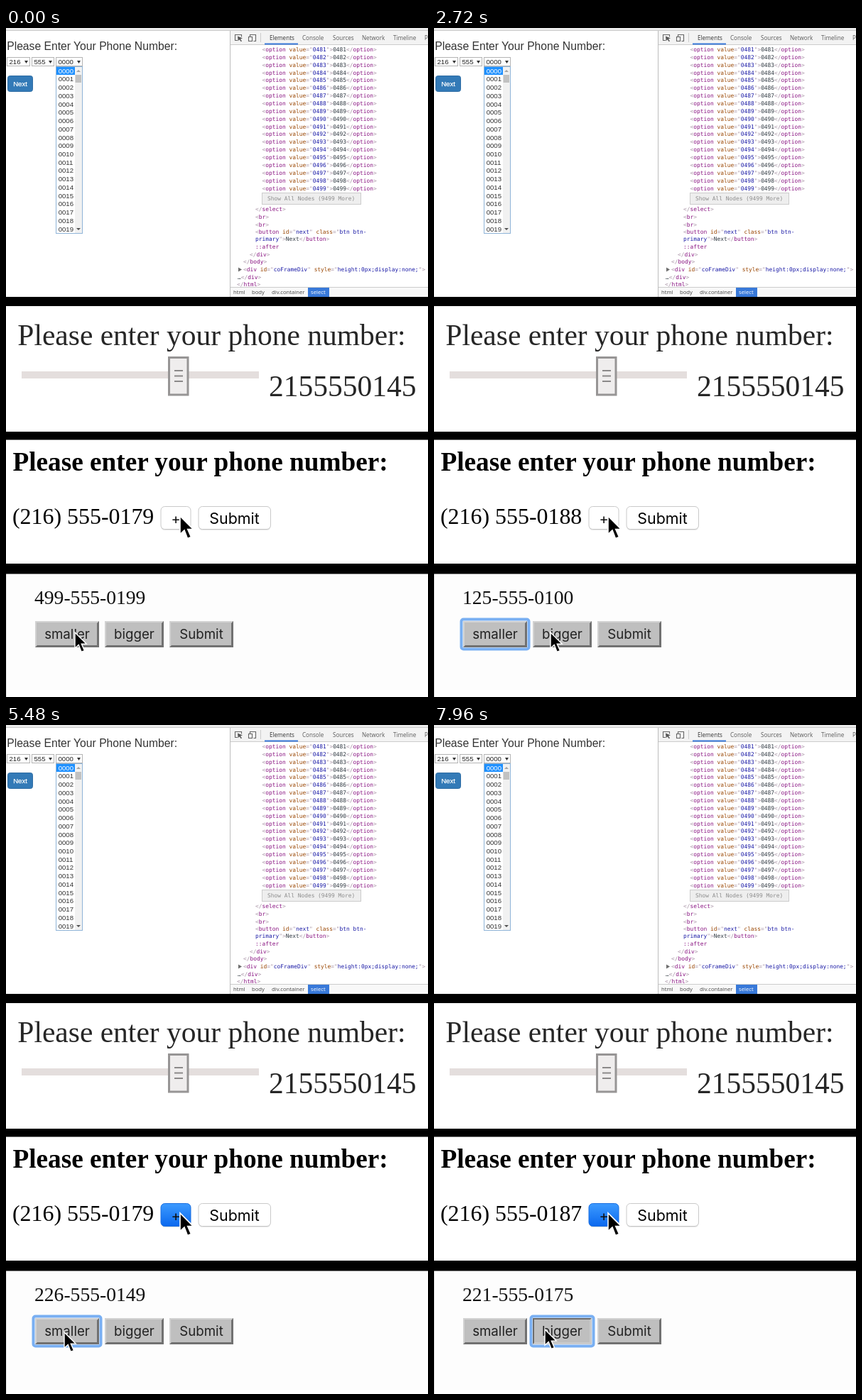
An HTML page for the animation above (8000 ms loop, 594x943 px).

```html
<!DOCTYPE html>
<html lang="en">
<head>
<meta charset="utf-8">
<title>Phone number forms</title>
<style>
html, body { margin: 0; width: 100%; height: 100%; overflow: hidden; background: #fff; }
svg { display: block; width: 594px; height: 943px; }
text { white-space: pre; }
.sans { font-family: "Liberation Sans", Arial, sans-serif; }
.serif { font-family: "Liberation Serif", Times, serif; }
.ui { font-family: "Open Sans", sans-serif; }
.mac { font-family: Inter, sans-serif; }
.mono { font-family: "DejaVu Sans Mono", monospace; }
</style>
</head>
<body>
<svg id="stage" viewBox="0 0 594 943" xmlns="http://www.w3.org/2000/svg">
  <defs>
    <linearGradient id="blue" x2="0" y2="1">
      <stop offset="0" stop-color="#3d9bff"/><stop offset="1" stop-color="#0a68ee"/>
    </linearGradient>
  </defs>
</svg>
<script>
const LOOP = 8000, STEP = 40;
const stage = document.getElementById('stage');

function add(tag, attrs, parent = stage) {
  const node = document.createElementNS('http://www.w3.org/2000/svg', tag);
  for (const key in attrs) node.setAttribute(key, attrs[key]);
  return parent.appendChild(node);
}
const rect = (x, y, width, height, fill, more = {}) => add('rect', { x, y, width, height, fill, ...more });
const path = (d, fill, more = {}) => add('path', { d, fill, ...more });
function text(x, y, content, family, size, fill = '#000', more = {}) {
  const node = add('text', { x, y, class: family, 'font-size': size, fill, ...more });
  node.textContent = content;
  return node;
}
const middle = { 'text-anchor': 'middle' };

// Phone number drop-downs
function dropdown(x, width, label) {
  rect(x + .5, 41.5, width, 12, '#fff', { stroke: '#b4b4b4' });
  text(x + 3.5, 51, label, 'sans', 9.6, '#222');
  path(`M${x + width - 7} 46h5l-2.5 4z`, '#333');
}
function drawDropdowns() {
  rect(0, 0, 594, 3, '#ececec');
  rect(0, 3, 594, 1, '#c9c9c9');
  text(1.2, 31, 'Please Enter Your Phone Number:', 'sans', 15.7, '#333');
  dropdown(1, 32, '216');
  dropdown(36, 31, '555');
  dropdown(70, 37, '0000');
  rect(2.5, 67.5, 35, 22, '#337ab7', { rx: 3, stroke: '#2e6da4' });
  text(20, 82, 'Next', 'sans', 9.6, '#fff', { ...middle, stroke: '#fff', 'stroke-width': .25 });
  rect(70.5, 54.5, 37, 235, '#fff', { stroke: '#8fb4d8' });
  rect(71, 55, 26, 11, '#1e90ff');
  for (let i = 0; i < 20; i++)
    text(73.7, 63.6 + i * 11.74, String(i).padStart(4, '0'), 'sans', 9.6, i ? '#333' : '#fff');
  rect(97, 55, 10, 234, '#f1f1f1');
  rect(97.5, 66, 8.5, 11, '#c1c1c1');
  path('M99 62h6l-3-3z', '#a3a3a3');
  path('M99 282h6l-3 3z', '#505050');
}

// Developer tools
const INK = { mark: '#a894a6', tag: '#881280', attr: '#994500', value: '#1a1aa6', plain: '#303942' };
const MONO = 7.88;
function markup(x, y, source) {
  const line = add('text', { x, y: y + 2.6, class: 'mono', 'font-size': MONO });
  const span = (kind, content) => {
    if (content) add('tspan', { fill: INK[kind] }, line).textContent = content;
  };
  const token = /^([^<>"]+)(")|(<\/?)([a-z]+)|([a-z]+)(=")([^"]*)("?)|(>)|(\s+|[^<>"\s]+)/gi;
  for (const m of source.matchAll(token)) {
    const kinds = ['value', 'mark', 'mark', 'tag', 'attr', 'mark', 'value', 'mark', 'mark', 'plain'];
    kinds.forEach((kind, i) => span(kind, m[i + 1]));
  }
}
function drawTools() {
  rect(315, 4, 279, 375, '#fff');
  rect(315, 4, 279, 19, '#f3f3f3');
  rect(315, 23, 279, 1, '#ccc');
  rect(315, 4, 1, 375, '#bdbdbd');
  const outline = { stroke: '#666', 'stroke-width': 1.1 };
  path('M326 17.5h-3.5v-8h9v3', 'none', outline);
  path('M326 11.5l7 3-3 1 2 3-1.3 .8-2-3-2 2z', '#555');
  path('M343.5 12v-2.5h8v9h-3', 'none', outline);
  rect(341.5, 12.5, 5, 6, '#f3f3f3', outline);
  rect(358, 7, 1, 13, '#ccc');
  rect(364, 21.5, 47, 2, '#3879d9');
  [[371, 'Elements'], [417, 'Console'], [460, 'Sources'], [501, 'Network'], [545, 'Timeline'], [589, 'P']]
    .forEach(([x, label], i) => text(x, 17, label, 'ui', 8.1, i ? '#5a5a5a' : '#333'));

  for (let i = 0; i < 19; i++) {
    const n = '0' + (481 + i);
    markup(360.5, 30.3 + i * 10.87, `<option value="${n}">${n}</option>`);
  }
  rect(360.5, 232.5, 139, 16, '#eee', { stroke: '#ccc' });
  text(368, 243.3, 'Show All Nodes (9499 More)', 'mono', MONO, '#8c8c8c');
  [
    [351, 255, '</select>'],
    [351, 266, '<br>'],
    [351, 277, '<br>'],
    [351, 287, '<button id="next" class="btn btn-'],
    [351, 297, 'primary">Next</button>'],
    [343, 319, '</div>'],
    [334, 329.5, '</body>'],
    [334, 340.5, '<div id="coFrameDiv" style="height:0px;display:none;">'],
    [326, 351, '…</div>'],
    [325, 361, '</html>']
  ].forEach(row => markup(...row));
  text(351, 310.5, '::after', 'mono', MONO, INK.tag);
  path('M327 337.5v6l5-3z', '#6e6e6e');

  rect(316, 365, 278, 14, '#f8f8f8');
  rect(316, 365, 278, 1, '#ccc');
  rect(425, 366, 30, 13, '#3879d9');
  [[320, 'html'], [346, 'body'], [374, 'div.container'], [429, 'select']]
    .forEach(([x, label], i) => text(x, 375, label, 'ui', 7.7, i === 3 ? '#fff' : '#444'));
}

function drawSlider() {
  text(16.3, 447, 'Please enter your phone number:', 'serif', 41.5, '#262626');
  rect(22, 484, 334, 10, '#e4dedd');
  rect(229.5, 464.5, 26.5, 52.5, '#efeded', { stroke: '#979595', 'stroke-width': 3 });
  for (const y of [482, 489.5, 497]) rect(237, y, 12, 2, '#8b8989');
  text(370, 519, '2155550145', 'serif', 41.5, '#262626');
}

function arrow(scale) {
  return path('M0 0V25.5L6 20L10.5 31.5L15.5 29.5L10.7 18.5H18.5Z', '#000',
    { stroke: '#fff', 'stroke-width': 1.6, 'data-scale': scale });
}
function place(node, x, y) {
  node.setAttribute('transform', `translate(${x} ${y}) scale(${node.dataset.scale})`);
}

function drawCounter() {
  text(9.4, 624, 'Please enter your phone number:', 'serif', 37.25, '#000', { 'font-weight': 700 });
  const number = text(9, 699, '', 'serif', 31.9);
  const soft = { rx: 5.5, stroke: '#c9c9c9' };
  rect(218, 675.5, 42, 32.5, '#e4e4e4', { rx: 5.5 });
  const plus = rect(218, 674.5, 42, 32, '#fff', soft);
  text(239, 699, '+', 'mac', 20, '#111', middle);
  rect(271, 675.5, 101.5, 32.5, '#e4e4e4', { rx: 5.5 });
  rect(271, 674.5, 101.5, 32, '#fff', soft);
  text(321.5, 699, 'Submit', 'mac', 21.4, '#000', middle);
  place(arrow(1), 245, 688);
  return { number, plus };
}

function greyButton(x, width, label) {
  const ring = rect(x - 2.5, 833.5, width + 5, 42, '#fff', { rx: 3, stroke: '#79aff2', 'stroke-width': 4 });
  rect(x, 836, width, 37, '#bfbfbf');
  const right = x + width;
  const light = path(`M${x} 873V836H${right}l-2 2H${x + 2}V871z`);
  const dark = path(`M${right} 836V873H${x}l3-3H${right - 3}V839z`);
  text(x + width / 2, 860.5, label, 'mac', 18.7, '#222', middle);
  return (focused, pressed) => {
    ring.style.display = focused ? '' : 'none';
    light.setAttribute('fill', pressed ? '#6c6c6c' : '#d2d2d2');
    dark.setAttribute('fill', pressed ? '#cacaca' : '#717171');
  };
}
function drawSearch() {
  rect(0, 769, 594, 174, '#fdfdfd');
  rect(0, 769, 1, 174, '#e2e2e2');
  const number = text(40, 812, '', 'serif', 27.6, '#111');
  const smaller = greyButton(41, 90, 'smaller');
  const bigger = greyButton(139, 83, 'bigger');
  greyButton(230, 90, 'Submit')(false, false);
  return { number, smaller, bigger, pointer: arrow(.87) };
}

drawDropdowns();
drawTools();
drawSlider();
const counter = drawCounter();
const search = drawSearch();
for (const [y, height] of [[379, 13], [569, 11.5], [755, 14.5]]) rect(0, y, 594, height, '#000');

// Release times of the plus button; this panel repeats faster than the page
const COUNTER_LOOP = 5440, HOLD = 150;
const clicks = [190, 520, 850, 1180, 1460, 1990, 2200, 2410, 2620, 2900, 3240, 3640, 4040, 4440, 4900, 5280];

function showCounter(time) {
  const t = time % COUNTER_LOOP;
  const count = clicks.filter(c => c <= t).length;
  const pressed = clicks.some(c => t >= c - HOLD && t < c);
  counter.number.textContent = `(216) 555-0${179 + count}`;
  counter.plus.setAttribute('fill', pressed ? 'url(#blue)' : '#fff');
  counter.plus.setAttribute('stroke', pressed ? '#1a6fe0' : '#c9c9c9');
}

// press time, release time, button, number shown after release
const guesses = [
  [720, 880, 'smaller', '250-555-0100'],
  [2120, 2240, 'smaller', '125-555-0100'],
  [2840, 2960, 'bigger', '187-555-0100'],
  [3760, 3920, 'bigger', '218-555-0199'],
  [4640, 4800, 'bigger', '234-555-0199'],
  [5240, 5360, 'smaller', '226-555-0149'],
  [5880, 6000, 'smaller', '222-555-0124'],
  [6400, 6520, 'smaller', '220-555-0151'],
  [7360, 7520, 'bigger', '221-555-0175'],
  [7900, 8100, 'bigger', '']
];
const trail = [
  [0, 97, 852], [240, 97, 852], [560, 78, 852], [2360, 78, 852], [2720, 164, 852],
  [4840, 164, 852], [5180, 82, 856], [6880, 82, 856], [7240, 156, 852], [8000, 156, 852]
];

function pointerAt(t) {
  const i = trail.findIndex(p => p[0] > t);
  const [t0, x0, y0] = trail[i - 1], [t1, x1, y1] = trail[i];
  const k = (t - t0) / (t1 - t0), ease = k * k * (3 - 2 * k);
  return [x0 + (x1 - x0) * ease, y0 + (y1 - y0) * ease];
}

function showSearch(t) {
  let number = '499-555-0199', focus = '', held = false;
  for (const [down, up, button, result] of guesses) {
    if (t < down) break;
    focus = button;
    held = t < up;
    if (!held) number = result;
  }
  search.number.textContent = number;
  search.smaller(focus === 'smaller', held && focus === 'smaller');
  search.bigger(focus === 'bigger', held && focus === 'bigger');
  place(search.pointer, ...pointerAt(t));
}

function frame() {
  const t = Math.floor(performance.now() % LOOP / STEP) * STEP;
  showCounter(t);
  showSearch(t);
  requestAnimationFrame(frame);
}
frame();
</script>
</body>
</html>
```
